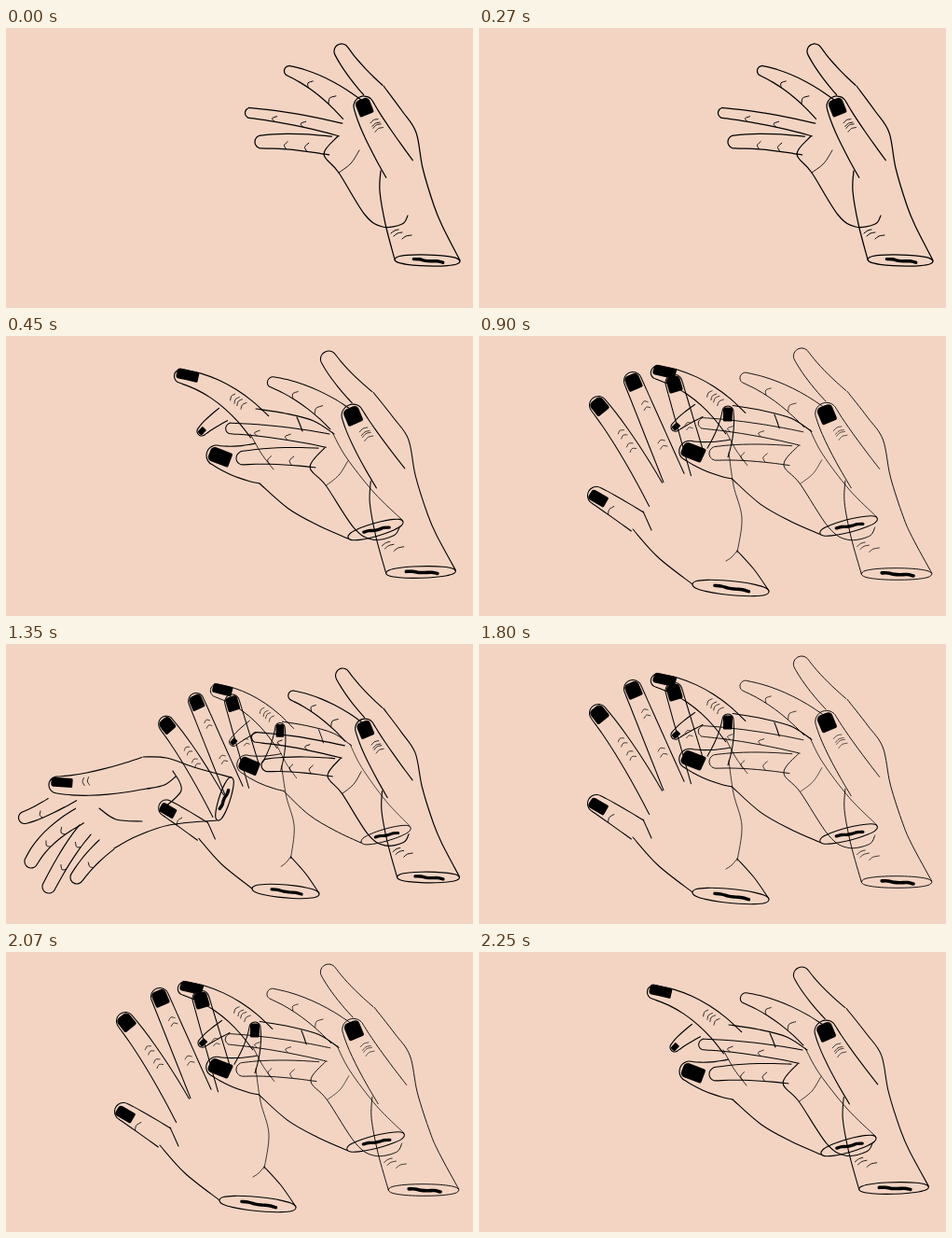
An HTML page with a canvas for the animation above (2.7 s loop, 501 px wide and 300 px high).

```html
<!DOCTYPE html>
<html lang="en">
<head>
<meta charset="utf-8">
<title>Hands</title>
<style>
html, body { margin: 0; width: 100%; height: 100%; overflow: hidden; background: #f3d4c3; }
canvas { display: block; }
</style>
</head>
<body>
<canvas id="stage" width="501" height="300"></canvas>
<script>
const ctx = document.getElementById('stage').getContext('2d');
const STEP = 450;
const ORDER = [0, 1, 2, 3, 2, 1];

const parse = text => text.split(' ').map(pair => pair.split(',').map(Number));
const mix = (a, b, t) => a + (b - a) * t;
const range = (n, make) => Array.from({ length: n }, (_, i) => make(i));

// Smooth curve through every point.
function trace(points, closed = false) {
  const n = points.length;
  const at = i => closed ? points[(i + n) % n] : points[Math.max(0, Math.min(n - 1, i))];
  ctx.beginPath();
  ctx.moveTo(...points[0]);
  for (let i = 0; i < (closed ? n : n - 1); i++) {
    const [a, b, c, d] = [at(i - 1), at(i), at(i + 1), at(i + 2)];
    ctx.bezierCurveTo(
      b[0] + (c[0] - a[0]) / 6, b[1] + (c[1] - a[1]) / 6,
      c[0] - (d[0] - b[0]) / 6, c[1] - (d[1] - b[1]) / 6,
      c[0], c[1]);
  }
}

function stroke(points, weight, closed) {
  trace(points, closed);
  ctx.lineWidth = weight;
  ctx.stroke();
}

const edge = text => weight => stroke(parse(text), weight);
const fine = text => weight => stroke(parse(text), weight * 0.7);

// A finger follows a bent spine: centre of the tip, middle, base.
// The left side is the one to the right hand of someone walking from tip to base.
function finger(spine, tipWidth, baseWidth, options = {}) {
  const [tip, middle, base] = parse(spine);
  const { left = 1, right = 1, nail, palm = [], knuckles = [] } = options;
  const bend = [0, 1].map(k => 2 * middle[k] - (tip[k] + base[k]) / 2);

  function heading(t) {
    const [x, y] = [0, 1].map(k => mix(bend[k] - tip[k], base[k] - bend[k], t));
    const length = Math.hypot(x, y);
    return [x / length, y / length];
  }
  // Point at t along the spine, moved by pixels along and across it.
  function place(t, along, across) {
    const [dx, dy] = heading(t);
    const [x, y] = [0, 1].map(k => mix(mix(tip[k], bend[k], t), mix(bend[k], base[k], t), t));
    return [x + dx * along - dy * across, y + dy * along + dx * across];
  }
  const width = t => mix(tipWidth, baseWidth, t);
  const side = (t, share) => place(t, 0, width(t) * share);

  return weight => {
    const round = range(7, i => {
      const angle = Math.PI * (i + 1) / 8;
      return place(0, -tipWidth * Math.sin(angle), tipWidth * Math.cos(angle));
    });
    stroke([
      ...range(6, i => side(left * (1 - i / 5), 1)),
      ...round,
      ...range(6, i => side(right * i / 5, -1))
    ], weight);
    for (const t of palm) stroke([side(t, 0.95), side(t - 0.03, 0.5), side(t + 0.02, 0)], weight * 0.8);
    for (const t of knuckles) {
      for (const u of [t, t + 0.06]) stroke([side(u, 0.1), side(u - 0.02, -0.25), side(u, -0.6)], weight * 0.7);
    }
    if (nail) {
      const [long, wide, shift] = nail;
      const centre = long - tipWidth * 0.75;
      const corner = (a, b) => place(0, centre + a * long, shift + b * wide);
      ctx.beginPath();
      ctx.moveTo(...corner(0, 1));
      for (const [a, b] of [[1, 1], [1, -1], [-1, -1], [-1, 1]]) {
        ctx.arcTo(...corner(a, b), ...corner(b, -a), wide * (a < 0 ? 0.6 : 0.25));
      }
      ctx.closePath();
      ctx.fill();
    }
  };
}

// Cut wrist: a flat oval from end to end with the bone inside.
function wrist(ends, height) {
  const [a, b] = parse(ends);
  const length = Math.hypot(b[0] - a[0], b[1] - a[1]);
  const place = (t, up) => [
    mix(a[0], b[0], t) + (b[1] - a[1]) / length * up,
    mix(a[1], b[1], t) - (b[0] - a[0]) / length * up
  ];
  return weight => {
    stroke(range(14, i => {
      const angle = i / 7 * Math.PI;
      const up = Math.sin(angle);
      return place(0.5 - 0.5 * Math.cos(angle), height * Math.sign(up) * Math.abs(up) ** 0.8);
    }), weight, true);
    stroke(range(6, i => place(0.29 + i * 0.09, 1 - i / 2 + Math.sin(i * 2) / 2)), 3.4);
  };
}

// Small wrinkles, one below the other.
const wrinkles = (x, y) => weight => {
  for (let i = 0; i < 3; i++) {
    const [px, py] = [x + i * i * 3, y + i * 3];
    stroke([[px, py], [px + 4, py - 3], [px + 8 + i, py - 4]], weight * 0.8);
  }
};

const rightHand = {
  marks: '361,17 267,122 452,249',
  parts: [
    finger('360,25 375,46 396,69', 8, 11, { left: 0.9 }),
    finger('304,46 338,62 371,87', 5.5, 14, { palm: [0.35, 0.72] }),
    finger('262,91 310,98 359,109', 5.5, 7, { palm: [0.28, 0.6] }),
    finger('274,122 308,122 348,126', 7, 10, { palm: [0.4, 0.7] }),
    finger('384,84 398,112 422,151', 11, 17, { nail: [9, 8, 0], knuckles: [0.33, 0.42] }),
    edge('405,62 425,89 440,112 447,150 459,190 468,212 487,249'),
    edge('356,116 341,135 357,155 385,200 404,213 425,210 431,201'),
    fine('379,131 370,145 357,155'),
    edge('402,153 401,175 407,210 417,248'),
    wrinkles(413, 220),
    wrist('417,248 487,250', 6)
  ]
};

const crossHand = {
  marks: '180,40 231,131 397,209',
  parts: [
    finger('188,43 228,59 264,88', 7.5, 14, { left: 1.15, right: 1.1, nail: [12, 5.5, -2.5], knuckles: [0.68, 0.78] }),
    finger('210,102 219,94 233,84', 5, 8, { nail: [4, 3, 0] }),
    finger('226,128 248,134 272,136', 11, 22, { nail: [12, 8, 0], right: 0.9 }),
    edge('268,78 300,83 330,91 352,105'),
    fine('350,103 365,130 395,168 425,197'),
    edge('312,87 315,94 318,102'),
    fine('262,105 274,126 287,143'),
    edge('272,158 303,185 335,203 367,217'),
    wrist('367,216 426,199', 7)
  ]
};

const openHand = {
  marks: '128,73 267,82 270,270',
  parts: [
    finger('128,74 156,113 186,163', 9.5, 12, { left: 1.12, nail: [8.5, 8, 0], knuckles: [0.4, 0.56] }),
    finger('165,48 187,100 209,152', 9.5, 12, { nail: [8.5, 8, 0], knuckles: [0.24, 0.64] }),
    finger('209,50 220,88 234,136', 9, 10, { nail: [8.5, 7.5, 0], left: 1.1, right: 0.9, knuckles: [0.58] }),
    finger('267,81 264,102 256,125', 6, 12, { nail: [7.5, 5, 0] }),
    finger('126,171 144,182 170,199', 9.5, 12, { nail: [10, 6, 1.5], palm: [0.5] }),
    edge('176,188 181,199 185,208'),
    fine('268,125 273,160 282,195 277,232'),
    edge('277,230 295,250 311,273'),
    fine('265,241 271,237 277,230'),
    edge('165,207 192,237 229,266'),
    wrist('229,266 311,274', 7.5)
  ]
};

const leftHand = {
  marks: '45,152 76,257 234,166',
  parts: [
    finger('55,151 97,149 150,138', 9, 17, { nail: [11.5, 5, -3], knuckles: [0.36] }),
    finger('20,186 41,177 71,160', 6.5, 9, { right: 0.65, palm: [0.4] }),
    finger('27,233 47,207 79,184', 7, 9, { palm: [0.4, 0.7] }),
    finger('46,260 66,225 85,199', 7, 8, { palm: [0.3, 0.7] }),
    finger('76,250 91,231 110,213', 7, 9, { right: 0.9, palm: [0.4] }),
    edge('147,121 172,122 205,133 242,143'),
    edge('152,155 170,151 182,142'),
    edge('116,219 140,206 175,194 226,189'),
    edge('100,176 118,188 146,190'),
    edge('179,136 188,157 165,179'),
    wrist('242,143 227,189', 6)
  ]
};

// Each pose: hand, line weight, and where its three marks (two fingertips, wrist) land.
const pose = (hand, weight, marks = hand.marks) => ({ hand, weight, marks });
const poses = [
  [pose(rightHand, 1.25)],
  [
    pose(rightHand, 1, '347,16 247,131 445,253'),
    pose(crossHand, 1.15)
  ],
  [
    pose(rightHand, 0.85, '347,13 247,126 448,255'),
    pose(crossHand, 1.05, '184,36 231,126 397,205'),
    pose(openHand, 1.05)
  ],
  [
    pose(rightHand, 1.2, '362,26 274,130 453,250'),
    pose(crossHand, 1.05, '219,47 262,132 408,206'),
    pose(openHand, 1.15, '172,85 294,91 300,265'),
    pose(leftHand, 1.15)
  ]
];

function frame(marks) {
  const [o, p, q] = parse(marks);
  return new DOMMatrix([p[0] - o[0], p[1] - o[1], q[0] - o[0], q[1] - o[1], ...o]);
}

function draw(time) {
  ctx.resetTransform();
  ctx.fillStyle = '#f3d4c3';
  ctx.fillRect(0, 0, 501, 300);
  ctx.fillStyle = ctx.strokeStyle = '#000';
  ctx.lineCap = ctx.lineJoin = 'round';
  const step = Math.floor(time / STEP) % ORDER.length;
  for (const { hand, weight, marks } of poses[ORDER[step]]) {
    ctx.setTransform(frame(marks).multiply(frame(hand.marks).inverse()));
    for (const part of hand.parts) part(weight);
  }
}

const start = performance.now();
function tick() {
  draw(performance.now() - start);
  requestAnimationFrame(tick);
}
tick();
</script>
</body>
</html>
```
